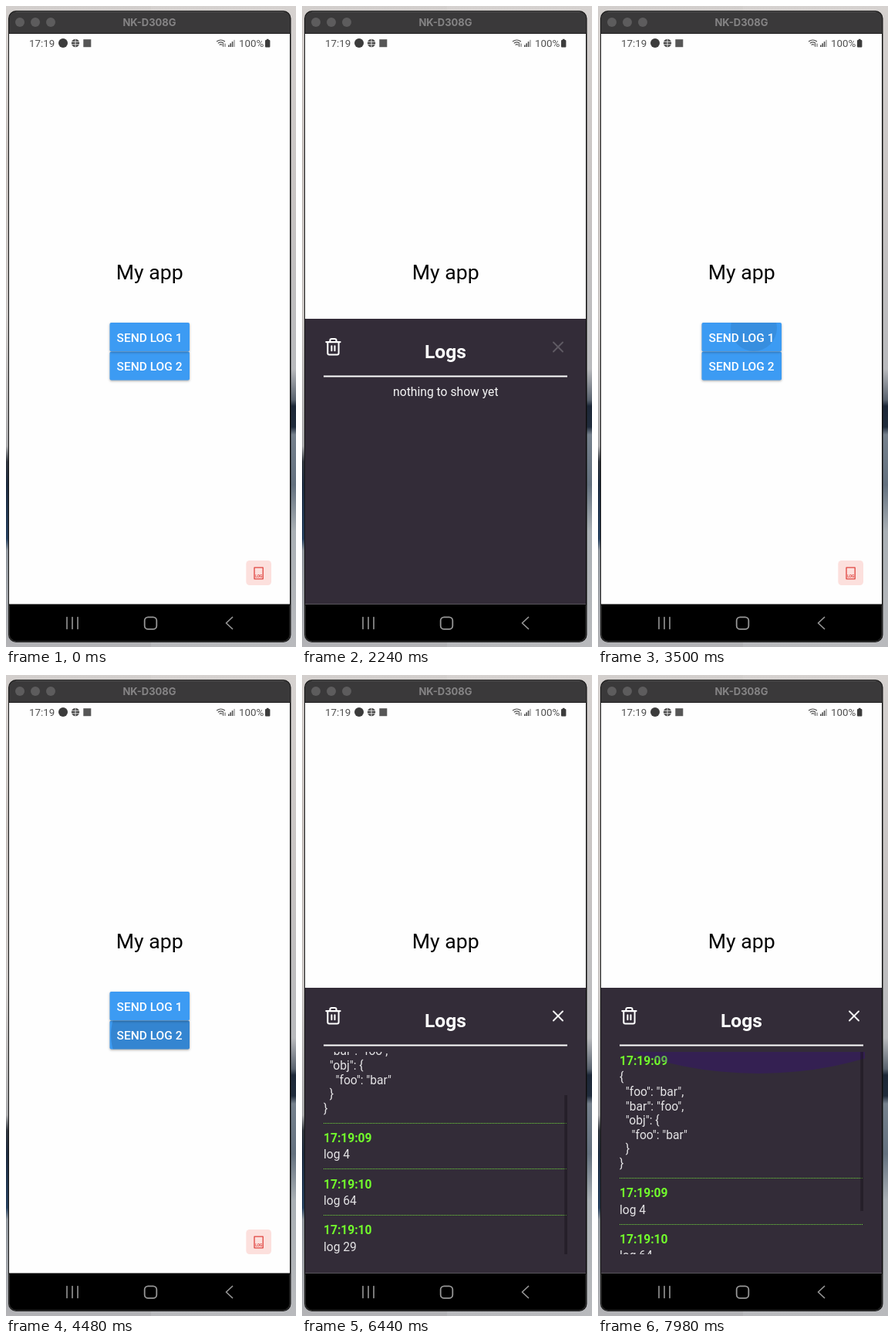
Animation of 376 by 830 pixels, one loop 8000 ms. Source, as an HTML page with a canvas:

```html
<!DOCTYPE html>
<html lang="en">
<head>
<meta charset="utf-8">
<title>Log panel demo</title>
<style>
html, body { margin: 0; width: 100%; height: 100%; overflow: hidden; background: #bbb7b6; }
canvas { display: block; width: 376px; height: 830px; }
</style>
</head>
<body>
<canvas id="stage"></canvas>
<script>
const W = 376, H = 830, LOOP = 8000, STEP = 70;
const canvas = document.getElementById('stage');
const dpr = window.devicePixelRatio || 1;
canvas.width = W * dpr;
canvas.height = H * dpr;
const c = canvas.getContext('2d');
c.scale(dpr, dpr);

const clamp = x => Math.max(0, Math.min(1, x));
const smooth = x => { x = clamp(x); return x * x * (3 - 2 * x); };

function box(x, y, w, h, r, fill) {
  c.beginPath();
  c.roundRect(x, y, w, h, r);
  if (fill) { c.fillStyle = fill; c.fill(); }
}

function disc(x, y, r, fill) {
  c.beginPath();
  c.arc(x, y, r, 0, Math.PI * 2);
  c.fillStyle = fill;
  c.fill();
}

function stroke(d, color, width, x = 0, y = 0, scale = 1) {
  c.save();
  c.translate(x, y);
  c.scale(scale, scale);
  c.lineCap = c.lineJoin = 'round';
  c.strokeStyle = color;
  c.lineWidth = width;
  c.stroke(new Path2D(d));
  c.restore();
}

function text(s, x, y, size, color, weight = 400, align = 'left', family = 'Roboto') {
  c.font = `${weight} ${size}px ${family}, sans-serif`;
  c.textAlign = align;
  c.fillStyle = color;
  c.fillText(s, x, y);
}

function strip(x, w, stops) {
  const g = c.createLinearGradient(0, 0, 0, H);
  for (const [y, color] of stops) g.addColorStop(y / H, color);
  c.fillStyle = g;
  c.fillRect(x, 0, w, H);
}

function wallpaper() {
  strip(0, W / 2, [[0, '#d3cfcd'], [200, '#c3bdba'], [400, '#cbc7c5'], [570, '#a9a9ab'],
    [590, '#30353d'], [620, '#1e2c40'], [690, '#26405f'], [705, '#8f959c'], [H, '#b3b3b6']]);
  strip(W / 2, W / 2, [[0, '#d6d2d0'], [250, '#c8c4c3'], [470, '#b9babd'], [510, '#5b6470'],
    [518, '#1d2838'], [545, '#202c3c'], [555, '#76818d'], [620, '#64717f'], [680, '#aab0b5'], [H, '#b9babd']]);
}

function statusBar() {
  const ink = '#505050';
  text('17:19', 30, 53, 13.3, ink);
  disc(74, 48, 6, '#3b3b3b');
  disc(90, 48, 5.2, '#484848');
  stroke('M85 46.3h10M85 49.8h10M90 43v10', '#fff', 0.8);
  box(100.3, 43.2, 10, 10, 0, '#565656');

  stroke('M273.5 45.8q5-3.6 10 0M275.2 48q3.3-2.4 6.6 0M277 50.2q1.5-1 3 0', ink, 1.2);
  stroke('M281.5 49v3.5M284 49v3.5', ink, 1);
  for (let i = 0; i < 4; i++) {
    c.fillStyle = i < 3 ? ink : '#aaa';
    c.fillRect(288 + i * 2.4, 50.5 - i * 2.2, 1.6, 2.5 + i * 2.2);
  }
  text('100%', 302, 53, 13.3, ink);
  box(336, 44, 6.4, 9.5, 1, '#3c3c3c');
  c.fillRect(337.8, 42.8, 2.8, 1.5);
}

function phone() {
  wallpaper();
  box(3, 6, 366.5, 818, 10, '#161616');
  box(4, 7, 364.5, 816, 9, '#000');
  box(4, 7, 364.5, 28.5, [9, 9, 0, 0], '#3a393a');
  stroke('M13 7.3H360', '#666', 0.7);
  stroke('M4.3 776V814a9 9 0 0 0 9 8.7H359a9 9 0 0 0 9-8.7V776', '#4a4a4a', 0.8);
  for (const x of [18, 38, 58]) disc(x, 21, 6, '#5d5c5d');
  text('NK-D308G', 186, 25.5, 13, '#858485', 700, 'center', 'Inter');

  c.fillStyle = '#fefefe';
  c.fillRect(4, 36, 364, 738.5);
  statusBar();
  text('My app', 186.3, 354, 26.7, '#050505', 400, 'center');

  const nav = '#969696';
  stroke('M79 791.5v15M86 791.5v15M93 791.5v15', nav, 1.6);
  box(179.7, 791.3, 15.6, 15.6, 4.5);
  c.strokeStyle = nav;
  c.lineWidth = 1.8;
  c.stroke();
  stroke('M293.5 791.5l-8 7.5 8 7.5', nav, 1.7);
}

// Touch ripple: count of steps it is visible for, and its button
const ripples = [
  { at: 3500, steps: 7, button: 0, y: 417 },
  { at: 4270, steps: 6, button: 1, y: 466 },
  { at: 4760, steps: 6, button: 1, y: 466 },
  { at: 5320, steps: 6, button: 1, y: 466 }
];

function button(i, t) {
  const x = 134.5, y = 410 + i * 37.4, w = 103.5, h = 37.2;
  c.save();
  c.shadowColor = 'rgba(0,0,0,.32)';
  c.shadowBlur = 3 * dpr;
  c.shadowOffsetY = 1.2 * dpr;
  box(x, y, w, h, 2, '#3c9bf3');
  c.restore();
  for (const r of ripples) {
    const k = (t - r.at) / STEP;
    if (r.button !== i || k < 0 || k >= r.steps) continue;
    const alpha = 0.14 * Math.min(1, (k + 1.2) / 2) * clamp((r.steps - 1 - k) / 2);
    c.save();
    box(x, y, w, h, 2);
    c.clip();
    disc(202, r.y, 30 + 12 * k, `rgba(0,0,0,${alpha})`);
    c.restore();
  }
  text('SEND LOG ' + (i + 1), 186, y + 24.6, 15.5, '#fff', 500, 'center');
}

function logButton(pressed) {
  c.save();
  if (pressed) c.globalAlpha = 0.2;
  box(311.3, 718, 32.7, 32, 4.5, '#fce0dd');
  stroke('M322 727.2h11.2v14.6h-11.2z', '#e0443f', 1.3);
  text('LOG', 327.7, 739.6, 4.8, '#e0443f', 700, 'center');
  c.restore();
}

const logs = [
  ['17:19:09', '{', '  "foo": "bar",', '  "bar": "foo",', '  "obj": {', '    "foo": "bar"', '  }', '}'],
  ['17:19:09', 'log 4'],
  ['17:19:10', 'log 64'],
  ['17:19:10', 'log 29']
];
const LIST = { x: 28, y: 488, w: 316, h: 262 }, MAX_SCROLL = 71.2;

function logList(scroll, glow) {
  c.save();
  c.beginPath();
  c.rect(LIST.x, LIST.y, LIST.w + 2, LIST.h);
  c.clip();
  let y = 505 - scroll;
  logs.forEach(([time, ...lines], i) => {
    text(time, LIST.x, y, 15.6, '#72fd2c', 700);
    y += 21.4;
    for (const line of lines) {
      text(line, LIST.x, y, 15.6, '#e4e3e5');
      y += 18.6;
    }
    if (i < logs.length - 1) {
      c.fillStyle = '#6fd83c';
      const rule = Math.round(y - 5.6);
      for (let x = LIST.x; x < LIST.x + LIST.w; x += 2) c.fillRect(x, rule, 1, 1);
    }
    y += 19.6;
  });
  if (glow > 0) {
    const r = 500;
    disc(208, LIST.y + 28 * glow - r, r, `rgba(54,0,150,${0.28 * Math.sqrt(glow)})`);
  }
  const thumb = LIST.h * LIST.h / (LIST.h + MAX_SCROLL);
  c.fillStyle = 'rgba(20,16,24,.45)';
  c.fillRect(340.3, LIST.y + (LIST.h - thumb) * scroll / MAX_SCROLL, 3.7, thumb);
  c.restore();
}

const TRASH = 'M3 6h18M19 6v14a2 2 0 0 1-2 2H7a2 2 0 0 1-2-2V6m3 0V4a2 2 0 0 1 2-2h4a2 2 0 0 1 2 2v2M10 11v6M14 11v6';

function panel(t, filled) {
  c.fillStyle = '#332c38';
  c.fillRect(4, 405, 364, 369.5);
  stroke(TRASH, '#fff', 2, 28.2, 429, 1.02);
  text('Logs', 186, 455.5, 24.6, '#fff', 700, 'center');
  const closing = !filled && t >= 2240;
  stroke('M326 435.5l12 12M338 435.5l-12 12', closing ? 'rgba(255,255,255,.22)' : '#fff', 1.9);
  c.fillStyle = '#fff';
  c.fillRect(28, 478.5, 316, 2);
  if (filled) {
    const scroll = MAX_SCROLL * (1 - smooth((t - 7140) / 490));
    logList(scroll, clamp((t - 7560) / 420));
  } else {
    text('nothing to show yet', 186.3, 505, 15.7, '#f5f5f5', 400, 'center');
  }
}

function draw(time) {
  const t = Math.floor(time / STEP) * STEP;
  const filled = t >= 6440;
  phone();
  if (filled || (t >= 1120 && t < 2310)) {
    panel(t, filled);
  } else {
    button(1, t);
    button(0, t);
    logButton((t >= 980 && t < 1120) || t >= 6230);
  }
}

let start;
function frame(now) {
  start ??= now;
  draw((now - start) % LOOP);
  requestAnimationFrame(frame);
}
draw(0);
requestAnimationFrame(frame);
</script>
</body>
</html>
```
